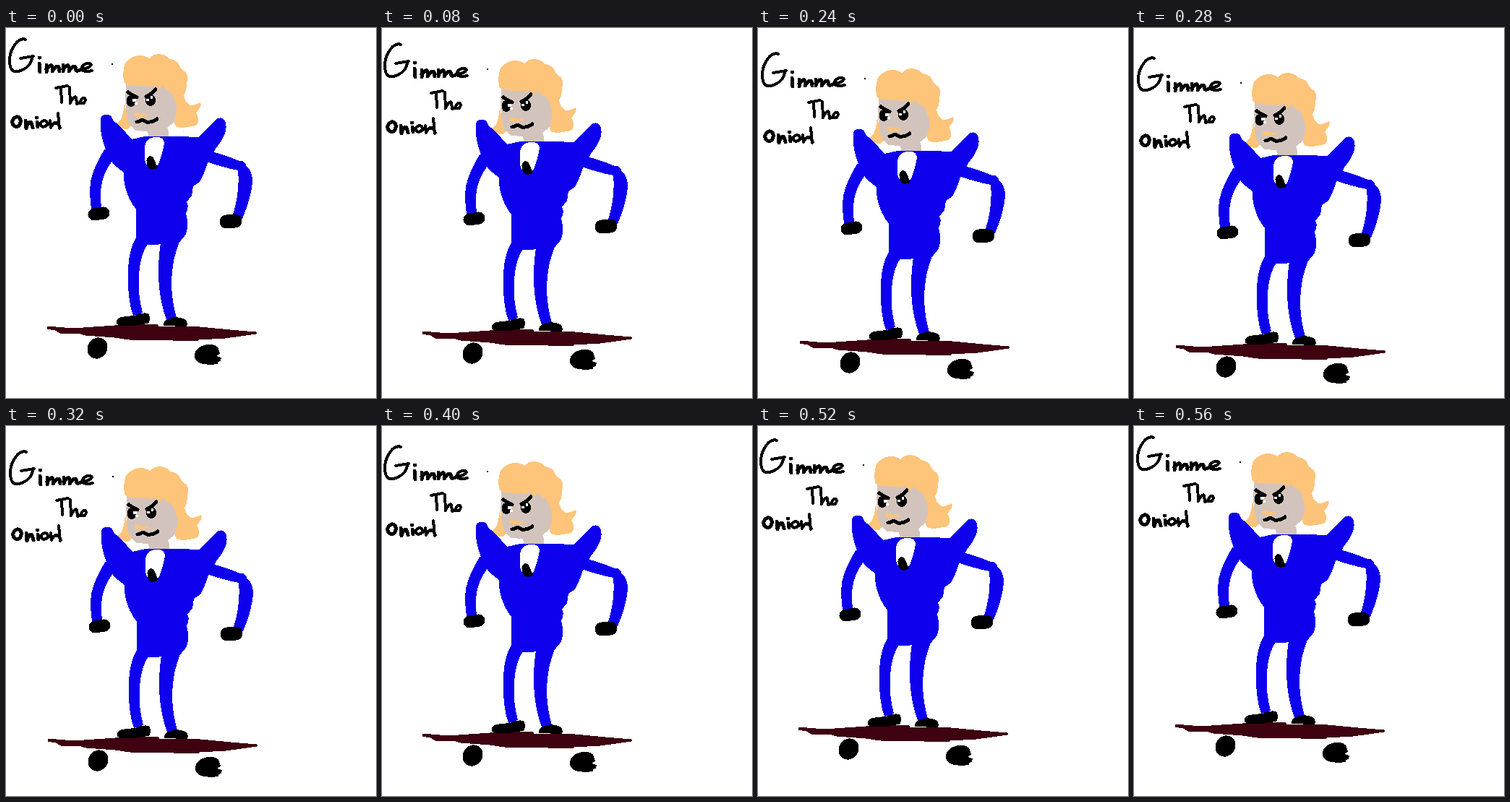
Recreate the animation shown at these times as an HTML page. Size 512 px wide and 512 px high, loop 0.6 s.

```html
<!DOCTYPE html>
<html lang="en">
<head>
<meta charset="utf-8">
<title>Gimme the onion</title>
<style>
html, body { margin: 0; width: 100%; height: 100%; overflow: hidden; background: #fff; }
svg { display: block; width: 100vw; height: 100vh; }
.ink { fill: none; stroke: #000; stroke-linecap: round; stroke-linejoin: round; }
</style>
</head>
<body>
<svg viewBox="0 0 512 512" shape-rendering="crispEdges" role="img" aria-label="Gimme the onion">
<g id="scene">
  <!-- lettering -->
  <g class="ink" stroke-width="4">
    <path d="M27 16C17 12 5 29 5 45C5 57 9 62 17 60C28 57 35 50 36 41M20 42L38 39"/>
    <path stroke-width="5" d="M46 49L47 61M46 41L47 41M56 51L56 61M56 57Q62 49 64 53L64 60Q69 51 73 54L74 60"/>
    <path stroke-width="5" d="M79 51L79 60M79 57Q85 49 87 53L87 60Q92 51 96 54L97 59Q101 60 104 57"/>
    <path d="M104 56Q114 57 118 51Q116 47 109 50Q102 54 106 59Q111 61 119 59"/>
    <path d="M69 83L85 80M76 82L77 103M88 82L89 104Q94 93 97 96L98 105Q103 104 104 99Q108 94 110 99Q109 106 103 104"/>
    <path stroke-width="5" d="M14 123Q8 126 9 132Q12 139 18 135Q22 129 19 125Q16 122 14 123"/>
    <path stroke-width="5" d="M27 128L28 139Q31 128 35 131L37 138M43 130L44 137M42 124L43 124"/>
    <path d="M53 128Q47 129 48 135Q52 139 57 134Q58 129 53 128M61 128L62 138Q66 129 71 131L75 138M72 118L74 139M56 134L69 132"/>
  </g>
  <path d="M146 49h2v2h-2z"/>
  <path d="M245 142h1v2h-1z" fill="#ddd"/>

  <!-- head -->
  <path fill="#fdc47a" d="M164 104L162 118L159 127L152 133L157 139L168 140L174 134L168 122Z"/>
  <path fill="#d2c4bc" d="M166 76L165 100L167 122L171 134L180 142L196 143L197 148L193 152H225V143L223 138L233 130L237 118L236 98L230 84L217 72Z"/>
  <path fill="#fdc47a" d="M163 74Q161 58 165 49Q172 39 184 38Q193 38 198 42Q204 36 212 36Q222 37 227 43Q235 45 239 49Q240 55 247 60Q252 64 251 70L249 87L246 93Q247 102 255 107Q262 107 269 103L270 106Q267 114 263 117Q267 124 266 130Q264 136 257 136Q245 139 237 137Q232 134 233 127Q237 118 236 107L232 95L228 88L222 86L219 83L217 78L214 84L210 85L207 79L199 81Q192 79 184 80Q174 79 166 78Z"/>
  <path fill="#fdc47a" d="M177 118Q183 115 188 119L196 118V122L186 123L177 122Z"/>
  <path class="ink" stroke-width="5" d="M169 89Q174 93 181 96M207 85Q201 92 194 95"/>
  <path class="ink" stroke-width="5" d="M181 130Q185 129 189 127L194 130Q203 131 209 126"/>
  <ellipse cx="173" cy="101" rx="6.500" ry="8"/>
  <ellipse cx="200" cy="100" rx="7" ry="8"/>
  <path fill="#fff" d="M175 98h5v4h-5zM178 103h4v3h-4zM200 94h3v4h-3zM194 98h4v3h-4z"/>

  <!-- suit -->
  <g fill="#0e00ec">
    <path d="M131 125Q133 119 140 120Q147 120 148 128Q158 135 166 145L174 154L192 150H240L266 151L289 128Q295 122 301 126Q306 131 304 143Q300 155 290 167L278 189Q274 203 268 213L259 219L257 232L250 241Q254 247 249 256L251 266Q252 282 247 288L238 299Q226 302 214 299Q202 302 190 299L180 290V251Q169 237 165 220Q162 206 163 200Q152 192 147 186Q135 165 132 148Q130 136 131 125Z"/>
    <path d="M137 167Q122 190 117 212Q115 230 118 250L132 248Q129 226 134 209Q139 194 148 183Z"/>
    <path d="M285 171Q307 177 323 184Q331 183 333 192Q341 197 341 213Q339 236 327 264L313 261Q324 228 321 197Q300 193 278 185Z"/>
    <path d="M181 288Q169 308 169 338Q168 376 176 398L189 394Q182 368 184 342Q186 312 197 298Z"/>
    <path d="M214 297Q209 330 212 359Q215 385 222 404L236 401Q229 377 229 350Q230 320 240 296Z"/>
  </g>
  <path fill="#fff" d="M192 166Q193 152 206 151Q219 150 219 160Q216 176 211 188Q207 195 200 194Q192 190 192 178Z"/>
  <path d="M195 180Q200 174 204 180L210 193Q206 197 198 195Q193 187 195 180Z"/>
  <path class="ink" stroke-width="17" d="M122 258L135 256"/>
  <path class="ink" stroke-width="19" d="M305 268L317 267"/>

  <!-- board -->
  <path fill="#3e0210" stroke="#3e0210" d="M57 413L69 414L92 416L136 413L165 411L209 410L211 413L268 414L310 418L346 421V423L325 426L303 429L267 431L264 433L230 432L170 431L150 428L110 425L103 423L75 422L68 418L57 416Z"/>
  <path d="M153 406Q153 400 166 399L178 398Q188 393 197 395Q201 402 197 409Q184 410 178 412H157Q152 410 153 406Z"/>
  <path d="M218 412Q218 404 226 402Q236 398 248 403Q252 407 250 413Z"/>
  <ellipse cx="126.500" cy="443" rx="13.500" ry="15" transform="rotate(32 126.500 443)"/>
  <path d="M261 453Q262 441 278 438Q292 437 294 444L296 451L291 454L298 456L297 461L293 462V465Q279 467 269 464Q261 461 261 453Z"/>
</g>
</svg>
<script>
const scene = document.getElementById("scene");
const STEP = 40, COUNT = 15;
// downward half of the bob; the way back mirrors it
const dx = [0, -1, -1, -1, -1, 0, 1, 1];
const dy = [0, 4, 7, 10, 13, 17, 20, 26];

function draw(ms) {
  const i = Math.floor(ms / STEP) % COUNT;
  const k = Math.min(i, COUNT - 1 - i);
  scene.setAttribute("transform", `translate(${dx[k]} ${dy[k]})`);
}

const start = performance.now();
function tick() {
  draw(performance.now() - start);
  requestAnimationFrame(tick);
}
draw(0);
requestAnimationFrame(tick);
</script>
</body>
</html>
```
